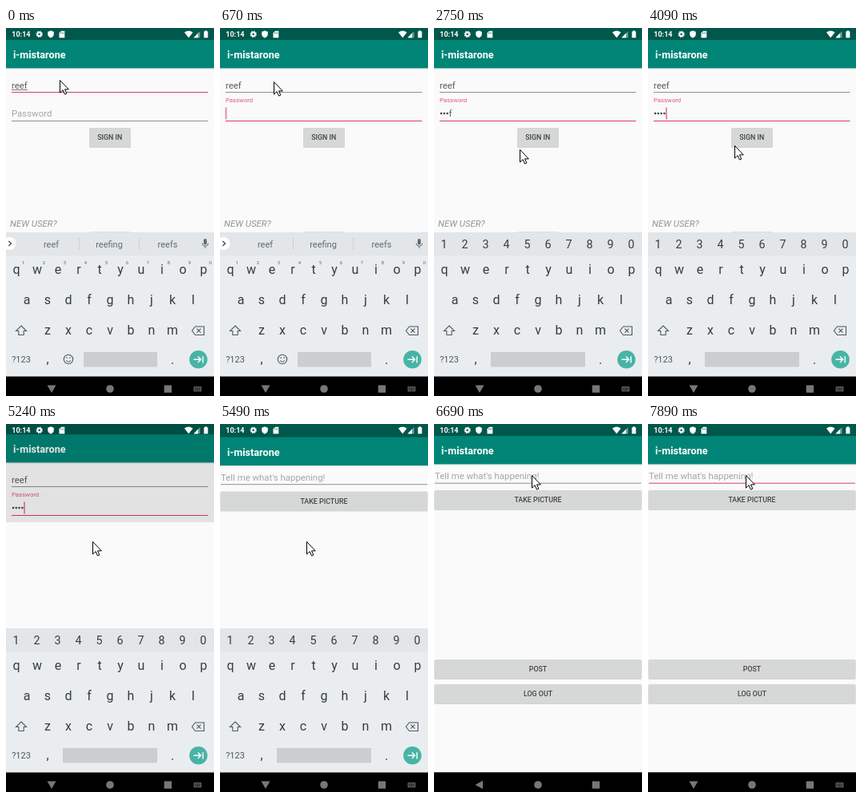
Animation of 260x461 px, one loop 8 s. Source, as an HTML page:

```html
<!DOCTYPE html>
<html lang="en">
<head>
<meta charset="utf-8">
<title>Sign in and post</title>
<style>
html, body { margin: 0; width: 100%; height: 100%; overflow: hidden; background: #fafafa; }
svg { position: absolute; left: 0; top: 0; width: 260px; height: 461px; }
text { font-family: Roboto, sans-serif; white-space: pre; }
.field { font-size: 11.4px; fill: #5a5a5a; }
.hint { fill: #a6a6a6; }
.title { font-size: 12.65px; font-weight: 600; fill: #fff; }
.label { font-size: 8.86px; font-weight: 500; fill: #444; text-anchor: middle; }
.clock { font-size: 9px; font-weight: 600; fill: #fff; }
.key { font-size: 16px; fill: #363d42; text-anchor: middle; }
.digit { font-size: 14.3px; fill: #363d42; text-anchor: middle; }
.tiny { font-size: 6px; fill: #5c666c; text-anchor: middle; }
.word { font-size: 11px; fill: #626c72; text-anchor: middle; }
.button { fill: #d6d7d7; }
.shade { opacity: .16; }
.icon { fill: none; stroke: #50595e; stroke-width: 1.1; }
</style>
</head>
<body>

<!-- sign-in page -->
<svg viewBox="0 0 260 461">
  <rect width="260" height="461" fill="#fafafa"/>
  <g id="signIn">
    <g class="header"></g>
    <text class="field" x="7" y="76">reef</text>
    <path id="composing" d="M7 77.5h20" stroke="#666" stroke-width=".9"/>
    <path id="nameLine" d="M7 80.5h245.5"/>
    <path id="passLine" d="M7 116.5h245.5"/>
    <g id="passLabel"><text font-size="11.4">Password</text></g>
    <g id="typed"></g>
    <path id="passCaret" d="M0 99.5v15" stroke="#d81b60"/>
    <rect class="shade" x="104" y="126" width="52" height="24" rx="1.5"/>
    <rect class="button" x="104" y="125" width="52" height="24" rx="1.5"/>
    <rect id="ripple" x="104" y="125" width="52" height="24" rx="1.5" fill="#000" opacity=".05"/>
    <text class="label" x="129.7" y="140.2">SIGN IN</text>
    <text class="field" x="5" y="249" font-style="italic" style="fill:#939393">NEW USER?</text>
    <rect class="button" x="104" y="255.2" width="52" height="24" rx="1.5"/>
  </g>
  <rect id="dim" width="260" height="461" fill="#000" opacity=".095"/>
</svg>

<!-- post page -->
<svg id="reveal" viewBox="0 0 260 461">
  <rect width="260" height="461" fill="#fafafa"/>
  <g id="post">
    <g class="header"></g>
    <text class="field hint" x="1" y="69">Tell me what's happening!</text>
    <path id="postLine" d="M1 74.2h258"/>
    <path id="postCaret" d="M1.8 57v15.5" stroke="#d81b60"/>
    <g id="wide"></g>
  </g>
</svg>

<!-- status bar and navigation bar -->
<svg viewBox="0 0 260 461">
  <text class="clock" x="7.3" y="11.2">10:14</text>
  <circle cx="41.700" cy="7.800" r="2.300" fill="none" stroke="#fff" stroke-width="2"/>
  <circle cx="41.700" cy="7.800" r="3.600" fill="none" stroke="#fff" stroke-width="1.200" stroke-dasharray="1.41"/>
  <g fill="#fff">
    <path d="M56 3.300l3.800 1.500v3q0 3-3.800 4.800q-3.800-1.800-3.800-4.800v-3z"/>
    <path d="M69 3.800h4.300v8.400h-6.800v-6z"/>
    <path d="M228.300 12.300l-5.300-6.700q5.300-4.200 10.600 0z"/>
    <path d="M242.500 4v8.300h-8z" opacity=".45"/>
    <path d="M240 6.600v5.700h-5.500z"/>
    <path d="M248.800 3.300h2.200v1h1.400v8h-5v-8h1.400z"/>
  </g>
  <path d="M68.500 5.500v1.800m1.700-1.800v1.800m1.700-1.800v1.800" stroke="#00574b" stroke-width=".7"/>
  <rect y="436.300" width="260" height="25"/>
  <g fill="#777">
    <circle cx="130" cy="452" r="4.800"/>
    <rect x="197.700" y="447.400" width="9.400" height="9.400" rx=".6"/>
    <path id="navBack" d="M51.500 452l9.500-5.300v10.600z"/>
    <g id="navHide">
      <path d="M51.500 447.400h11l-5.500 9.700z"/>
      <rect x="234.500" y="449" width="10" height="6.500" rx=".8" fill="#555"/>
      <path d="M236 451h7m-7 1.500h7m-5.500 1.600h4" stroke="#000" stroke-width=".7" stroke-dasharray="1 .6"/>
    </g>
  </g>
</svg>

<!-- keyboard -->
<svg viewBox="0 0 260 461">
  <g id="keyboard">
    <rect y="256" width="260" height="180.300" fill="#e9edf0"/>
    <rect y="256" width="260" height="29" fill="#e2e6e9"/>
    <g id="keys"></g>
    <text class="word" x="19" y="419" style="fill:#50595e">?123</text>
    <text class="key" x="52" y="420">,</text>
    <text class="key" x="208" y="420.500">.</text>
    <path class="icon" d="M19 373l6.500 6.500h-3.300v5h-6.400v-5h-3.300z"/>
    <path class="icon" d="M236.500 374h11v10.500h-11l-4-5.250zM238.500 376.700l5 5m0-5l-5 5"/>
    <circle cx="240.500" cy="415.300" r="11.300" fill="#48b4a6"/>
    <path d="M234.500 415.300h9m-3.600-3.700l3.700 3.700l-3.700 3.700m6.300-7.800v8.200" fill="none" stroke="#fff" stroke-width="1.400"/>
    <g id="digitMode">
      <rect x="71" y="406" width="118" height="18.500" rx="1" fill="#cbced1"/>
    </g>
    <g id="wordMode">
      <rect x="97" y="406" width="92" height="18.500" rx="1" fill="#cbced1"/>
      <circle class="icon" cx="78" cy="415" r="5.700"/>
      <path class="icon" d="M75.200 416.500q2.800 3.400 5.600 0M76 412.200v1.700m4-1.700v1.700"/>
      <circle cx="4.500" cy="270" r="8" fill="#fff"/>
      <path d="M3.300 267l3.200 3l-3.200 3" fill="none" stroke="#444" stroke-width="1.300"/>
      <path d="M91.500 263v15m75-15v15" stroke="#cdd1d4"/>
      <text class="word" x="56.500" y="274.500">reef</text>
      <text class="word" x="129" y="274.500">reefing</text>
      <text class="word" x="202" y="274.500">reefs</text>
      <rect x="247" y="264" width="4" height="7.500" rx="2" fill="#626c72"/>
      <path d="M245.200 269.500a3.800 3.800 0 0 0 7.600 0M249 273.300v2.700" fill="none" stroke="#626c72"/>
    </g>
  </g>
</svg>

<!-- pointer -->
<svg viewBox="0 0 260 461">
  <path id="pointer" d="M.5.5v15.600l3.600-3.400l2.400 5.400l2.300-1l-2.300-5.200h4.800z" fill="#fff" stroke="#000"/>
</svg>

<script>
const LOOP = 8000;
const $ = id => document.getElementById(id);
const add = (id, markup) => $(id).insertAdjacentHTML('beforeend', markup);

for (const header of document.querySelectorAll('.header')) {
  header.innerHTML = `<rect y="-4" width="260" height="54.6" fill="#008577"/>
    <rect y="-4" width="260" height="19" fill="#00574b"/>
    <rect y="50.6" width="260" height="1" fill="#dfe2e2"/>
    <text class="title" x="9" y="38">i-mistarone</text>`;
}

// Evenly spaced characters
const row = (id, chars, x, y, cls = 'key') =>
  add(id, [...chars].map((c, i) =>
    `<text class="${cls}" x="${x + 26 * i}" y="${y}">${c}</text>`).join(''));

row('keys', 'qwertyuiop', 13, 307.600);
row('keys', 'asdfghjkl', 26, 345.500);
row('keys', 'zxcvbnm', 52, 383.500);
row('digitMode', '1234567890', 12.500, 276, 'digit');
row('wordMode', '1234567890', 21.500, 296, 'tiny');

[['TAKE PICTURE', 83], ['POST', 295], ['LOG OUT', 326]].forEach(([name, y]) =>
  add('wide', `<rect class="shade" x=".5" y="${y + 1}" width="259" height="24" rx="1.5"/>
    <rect class="button" x=".5" y="${y}" width="259" height="24" rx="1.5"/>
    <text class="label" x="130" y="${y + 15.2}">${name}</text>`));

// Hard changes written as CSS keyframes: each stop is [ms, declarations]
let css = '';
function steps(id, ...stops) {
  const frames = [...stops, [LOOP, stops.at(-1)[1]]]
    .map(([ms, rule]) => `${ms / LOOP * 100}%{${rule}}`).join('');
  css += `@keyframes ${id}{${frames}}#${id}{animation:${id} ${LOOP}ms step-end infinite}\n`;
}
const ON = 'visibility:visible', OFF = 'visibility:hidden';
const show = (id, from, to = LOOP) =>
  steps(id, ...(from ? [[0, OFF]] : []), [from, ON], ...(to < LOOP ? [[to, OFF]] : []));
const move = (x, y) => `transform:translate(${x}px,${y}px)`;

// Each typed letter turns into a dot
const typedAt = [1260, 1410, 1660, 1810], maskedAt = [1410, 1660, 1810, 3400];
[...'reef'].forEach((c, i) => {
  const x = 7 + 3.800 * i;
  add('typed', `<text id="letter${i}" class="field" x="${x}" y="111">${c}</text>
    <circle id="dot${i}" cx="${x + 2}" cy="107" r="1.3" fill="#444"/>`);
  show('letter' + i, typedAt[i], maskedAt[i]);
  show('dot' + i, maskedAt[i]);
});

const idle = 'stroke:#8f8f8f', focus = 'stroke:#d93a72';
steps('nameLine', [0, focus], [390, idle]);
steps('passLine', [0, idle], [390, focus]);
steps('postLine', [0, idle], [7210, focus]);
show('composing', 0, 390);

const label = (y, scale, color) => `transform:translate(7px,${y}px) scale(${scale});fill:${color}`;
steps('passLabel', [0, label(111, 1, '#a6a6a6')], [530, label(94.500, .72, '#de6a92')],
  [670, label(93, .68, '#de5585')]);

const caret = x => `${move(x, 0)};${ON}`;
steps('passCaret', [0, OFF], [390, caret(7.500)], [960, OFF], [1260, caret(12)],
  [1410, caret(18)], [1660, caret(22)], [1810, caret(23)], [2360, OFF],
  [2870, caret(23)], [3400, OFF], [4090, caret(23)]);
show('postCaret', 7340, 7890);
show('ripple', 3550, 4090);

// Page change
show('dim', 5240);
steps('signIn', [0, move(0, 0)], [5240, move(0, -2)]);
const clip = y => `clip-path:inset(${y}px 0 0 0)`;
steps('reveal', [0, clip(461)], [5240, clip(123)], [5360, clip(30)], [5490, clip(0)]);
steps('post', [0, move(0, 12)], [5360, move(0, 4)], [5490, move(0, 1.500)], [5640, move(0, 0)]);

show('wordMode', 0, 960);
show('digitMode', 960);
steps('keyboard', [0, `opacity:1;${move(0, 0)}`], [5940, `opacity:.66;${move(0, 11)}`],
  [6070, `opacity:.25;${move(0, 11)}`], [6190, `opacity:0;${move(0, 11)}`]);
show('navBack', 6330, 7490);
steps('navHide', [0, ON], [6330, OFF], [7490, ON]);

steps('pointer', [0, move(67, 65)], [120, move(67, 66)], [240, move(67, 67)],
  [2360, move(75, 100)], [2490, move(90, 153)], [2630, move(101, 161)],
  [2750, move(107, 152)], [2870, move(108, 147)], [6330, move(111, 135)],
  [6450, move(117, 98)], [6570, move(122, 70)], [6690, move(122, 64)]);

document.head.insertAdjacentHTML('beforeend', `<style>${css}</style>`);
</script>
</body>
</html>
```
